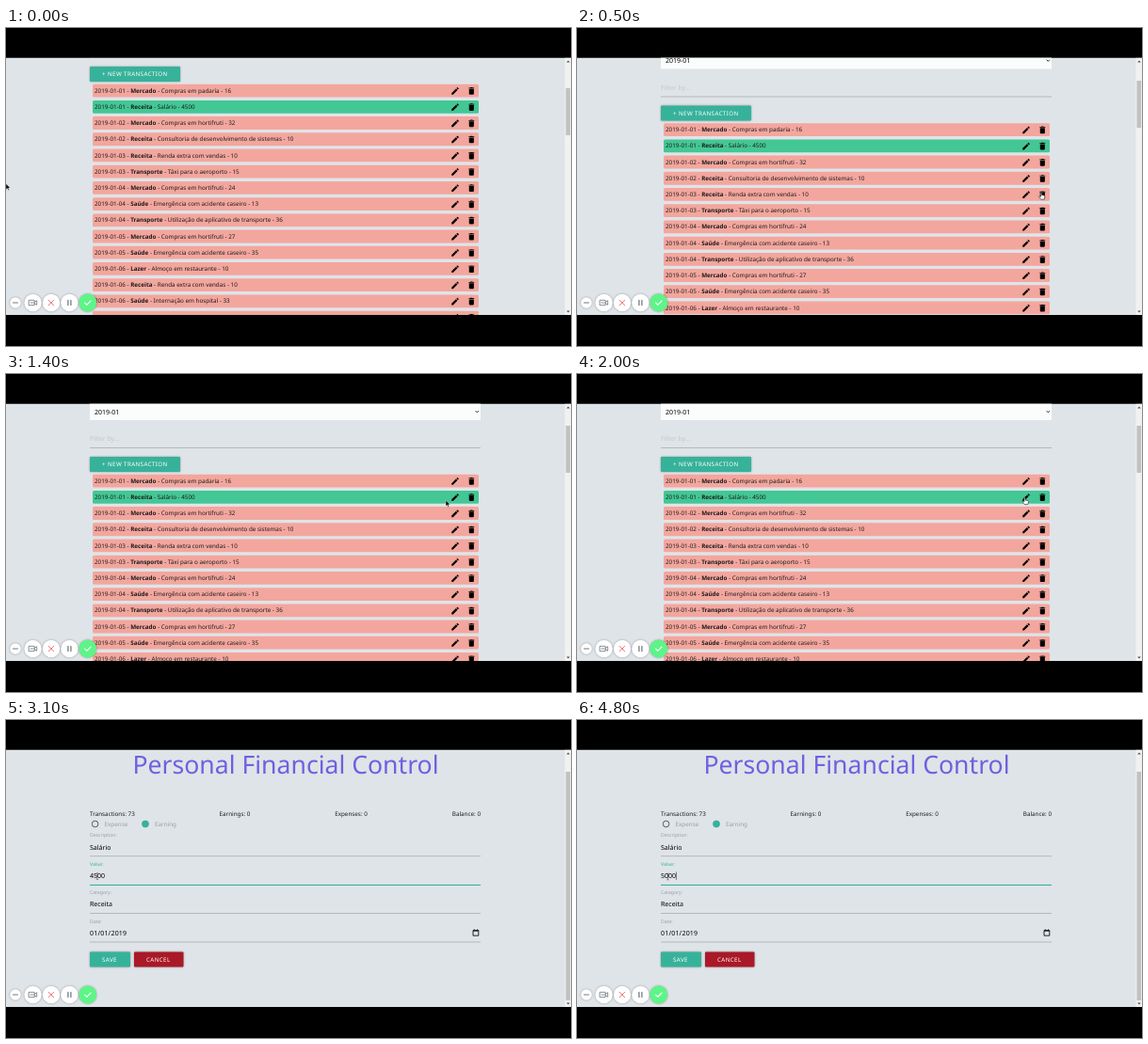
Recreate the animation shown at these times as an HTML page. Size 600 by 338 pixels, loop 5000 ms.

```html
<!DOCTYPE html>
<html lang="en">
<head>
<meta charset="utf-8">
<title>Personal Financial Control</title>
<style>
  html, body { margin: 0; width: 100%; height: 100%; overflow: hidden; background: #000; }
  svg { display: block; width: 600px; height: 338px; }
  text { font: 6.3px "Noto Sans", "Open Sans", sans-serif; fill: #1c1c1e; text-rendering: geometricPrecision; white-space: pre; }
  .bold { font-weight: 600; }
  .title { font-size: 26.6px; fill: #705fe0; }
  .value { font-size: 7px; fill: #000; }
  .label { font-size: 5.1px; fill: #9b9fa2; }
  .muted { fill: #9b9fa2; }
  .caps { font-size: 6.2px; fill: #fff; letter-spacing: .4px; }
  .shadow { filter: drop-shadow(0 .7px .8px #0005); }
</style>
</head>
<body>
<svg viewBox="0 0 600 338">
  <defs>
    <path id="edit" d="M3 17.25V21h3.75L17.81 9.94l-3.75-3.75L3 17.25zM20.71 7.04c.39-.39.39-1.02 0-1.41l-2.34-2.34c-.39-.39-1.02-.39-1.41 0l-1.83 1.83 3.75 3.75 1.83-1.83z"/>
    <path id="trash" d="M6 19c0 1.1.9 2 2 2h8c1.1 0 2-.9 2-2V7H6v12zM19 4h-3.5l-1-1h-5l-1 1H5v2h14V4z"/>
  </defs>
  <rect y="31.5" width="600" height="273.5" fill="#dfe4e8"/>
  <g id="list"></g>
  <g id="form"></g>

  <g id="scrollbar">
    <rect x="593.5" y="31.5" width="6.5" height="273.5" fill="#f1f1f1"/>
    <path d="M595.2 36.5l1.8-2 1.8 2zM595.2 300.5l1.8 2 1.8-2z" fill="#505050"/>
    <rect id="thumb" x="594.5" width="4.6" fill="#c1c1c1"/>
  </g>

  <g id="toolbar" fill="none" stroke-linecap="round">
    <g class="shadow" fill="#fff">
      <circle cx="10" cy="292" r="5.8"/>
      <circle cx="28.6" cy="292" r="9.2"/>
      <circle cx="48" cy="292" r="9.2"/>
      <circle cx="67.4" cy="292" r="9.2"/>
      <circle cx="86.8" cy="292" r="9.4" fill="#5df588"/>
    </g>
    <path d="M7.5 292h5" stroke="#777"/>
    <path d="M24.5 289.3h5.6v5.4h-5.6zM30.1 291.4l2.6-1.7v4.6l-2.6-1.7M26 292h2.5" stroke="#68717a" stroke-width=".8"/>
    <path d="M45.2 289.2l5.6 5.6m0-5.6l-5.6 5.6" stroke="#f27d7d"/>
    <path d="M65.9 289.4v5.2m3-5.2v5.2" stroke="#68717a" stroke-width="1.2"/>
    <path d="M83.6 292.2l2.2 2.1 4.2-4.3" stroke="#fff" stroke-width="1.1"/>
  </g>

  <g id="pointer" stroke-linejoin="round">
    <path id="arrow" d="M0 0v6.2l1.5-1.3 1 2.2 1-.4-1-2.2h2z" fill="#000" stroke="#fff" stroke-width=".4"/>
    <path id="hand" d="M-.6 0q.6-.6 1.2 0v2.6l2.6.5q.8.2.7 1l-.5 3H-.4L-2.6 4.4q0-.9.8-.7l1.2.9z" fill="#fff" stroke="#222" stroke-width=".6"/>
    <path id="beam" d="M-1.2-3.5q1.2 0 1.2.7v5.6q0 .7-1.2.7M1.2-3.5Q0-3.5 0-2.8M1.2 3.5Q0 3.5 0 2.8" fill="none" stroke="#333" stroke-width=".5"/>
  </g>
  <path d="M0 0h600v31.5H0zM0 305h600v33H0z"/>
</svg>
<script>
const $ = id => document.getElementById(id);
const TEAL = '#37b29a', LOOP = 5000, STEP = 100;

const text = (x, y, str, cls = '', attrs = '') =>
  `<text x="${x}" y="${y}" class="${cls}" ${attrs}>${str}</text>`;
const rect = (x, y, w, h, fill, attrs = '') =>
  `<rect x="${x}" y="${y}" width="${w}" height="${h}" fill="${fill}" ${attrs}/>`;
const button = (x, y, w, str, fill) =>
  rect(x, y, w, 16, fill, 'rx="1" class="shadow"') + text(x + 13, y + 10.2, str, 'caps');

const transactions = `01|Mercado|Compras em padaria|16
01|Receita|Salário|4500
02|Mercado|Compras em hortifruti|32
02|Receita|Consultoria de desenvolvimento de sistemas|10
03|Receita|Renda extra com vendas|10
03|Transporte|Táxi para o aeroporto|15
04|Mercado|Compras em hortifruti|24
04|Saúde|Emergência com acidente caseiro|13
04|Transporte|Utilização de aplicativo de transporte|36
05|Mercado|Compras em hortifruti|27
05|Saúde|Emergência com acidente caseiro|35
06|Lazer|Almoço em restaurante|10
06|Receita|Renda extra com vendas|10
06|Saúde|Internação em hospital|33
07|Mercado|Compras em hortifruti|30`.split('\n').map(line => line.split('|'));

const row = ([day, category, description, value], i) => {
  const y = 113.6 + i * 17.21;
  const icon = (id, x) => `<use href="#${id}" transform="translate(${x - 5.1} ${y - 4.8}) scale(.425)"/>`;
  return rect(92, y - 6.9, 410, 13.8, value > 1000 ? '#43c794' : '#f3a69d', 'rx="1.5"') +
    text(94, y + 2.1, `2019-01-${day} - <tspan class="bold">${category}</tspan> - ${description} - ${value}`) +
    icon('edit', 477) + icon('trash', 494.3);
};

$('list').innerHTML =
  rect(89, 20, 415, 29, '#fbfcfc') +
  text(94, 42.6, '2019-01', 'value') +
  '<path d="M498.7 39.2l1.6 1.7 1.6-1.7" fill="none" stroke="#111" stroke-width=".9"/>' +
  text(89, 71.4, 'Filter by...', 'value', 'style="fill:#c3c8cc"') +
  rect(89, 78.2, 415, .6, '#979b9e') +
  button(89, 88, 96, '+ NEW TRANSACTION', TEAL) +
  transactions.map(row).join('');

const field = (label, value, i) => {
  const y = 135.2 + i * 30.4;
  return text(89, y - 10.8, label, 'label', `id="label${i}"`) +
    text(89, y + 2.4, value, 'value', `id="value${i}"`) +
    rect(89, y + 9.3, 415, .6, '#979b9e', `id="line${i}"`);
};

$('form').innerHTML =
  text(297, 57, 'Personal Financial Control', 'title', 'text-anchor="middle"') +
  text(89, 102.4, 'Transactions: 73') +
  text(243, 102.4, 'Earnings: 0', '', 'text-anchor="middle"') +
  text(366.5, 102.4, 'Expenses: 0', '', 'text-anchor="middle"') +
  text(504, 102.4, 'Balance: 0', '', 'text-anchor="end"') +
  '<circle cx="94.6" cy="110.5" r="3.3" fill="none" stroke="#4a4d50" stroke-width=".9"/>' +
  text(104.5, 112.8, 'Expense', 'muted') +
  `<circle cx="148" cy="110.5" r="3.3" fill="none" stroke="${TEAL}" stroke-width=".9"/>` +
  `<circle id="dot" cx="148" cy="110.5" fill="${TEAL}"/>` +
  text(158, 112.8, 'Earning', 'muted') +
  rect(88.8, 161.4, 16.6, 9.2, '#9fc4f0', 'id="selection"') +
  ['Description:Salário', 'Value:4500', 'Category:Receita', 'Date:01/01/2019']
    .map((s, i) => field(s.split(':')[0] + ':', s.split(':')[1], i)).join('') +
  rect(0, 161.5, .5, 8.4, '#111', 'id="caret"') +
  '<path d="M496 223.6h5.8v5.6H496zM496 224.2h5.8M497.3 222.4v1M500.5 222.4v1" fill="none" stroke="#111" stroke-width=".9"/>' +
  button(89, 246.6, 43, 'SAVE', TEAL) +
  button(136, 246.6, 52.5, 'CANCEL', '#a91927');
$('value3').style.letterSpacing = '.2px';

// Keys are [time, value, value, ...], joined by straight lines.
const track = keys => t => {
  const i = keys.findIndex(k => k[0] > t);
  if (i < 0) return keys[keys.length - 1].slice(1);
  const a = keys[i - 1], b = keys[i], p = (t - a[0]) / (b[0] - a[0]);
  return a.slice(1).map((v, j) => v + (b[j + 1] - v) * p);
};
const scroll = track([[0, 47], [500, 5.5], [600, 0]]);
const pointer = track([
  [0, 0, 165.5], [500, 493, 175], [900, 462.5, 136], [1500, 468, 134],
  [2000, 475.5, 131.5], [2400, 475.5, 131.5], [2900, 97, 166], [4000, 96.5, 166.5]
]);
const fade = (t, from, to) => Math.min(1, Math.max(0, (t - from) / (to - from)));
const typed = t => t < 4000 ? '4500' : '5000'.slice(0, t < 4300 ? 1 : t < 4400 ? 2 : t < 4800 ? 3 : 4);
const show = (id, on) => $(id).style.display = on ? '' : 'none';

function draw(t) {
  const editing = t >= 2100;
  show('list', !editing);
  show('form', editing);

  const [offset] = scroll(t);
  $('list').setAttribute('transform', `translate(0 ${-offset})`);
  $('thumb').setAttribute('y', 55 + offset * .19);
  $('thumb').setAttribute('height', editing ? 243 : 50);

  const focus = fade(t, 2800, 3000);
  const tint = `color-mix(in srgb, ${TEAL} ${focus * 100}%, #979b9e)`;
  $('label1').style.fill = $('line1').style.fill = tint;
  $('line1').setAttribute('height', .6 + focus * .5);
  $('dot').setAttribute('r', 1.4 + 2.3 * fade(t, 2100, 2300));

  const value = typed(t);
  $('value1').textContent = value;
  show('selection', t >= 3500 && t < 4000);
  show('caret', t >= 4000);
  $('caret').setAttribute('x', 89.3 + value.length * 4);

  const [x, y] = pointer(t);
  $('pointer').setAttribute('transform', `translate(${x} ${y})`);
  const hand = t === 500 || t >= 1900 && t <= 2400;
  const beam = t > 2400;
  show('hand', hand);
  show('beam', beam);
  show('arrow', !hand && !beam);
}

function tick() {
  draw(Math.floor(performance.now() % LOOP / STEP) * STEP);
  requestAnimationFrame(tick);
}
tick();
</script>
</body>
</html>
```
